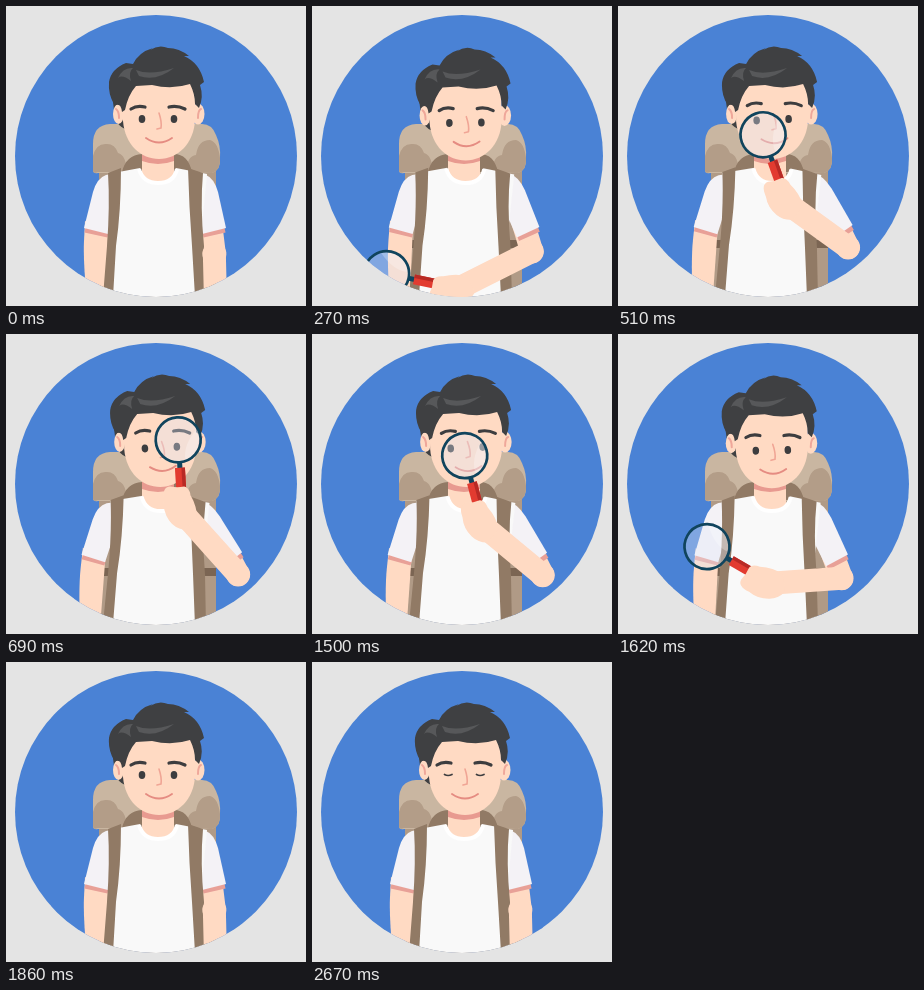
An HTML page that plays this animation: 300 by 300 pixels, repeating every 2700 ms.

```html
<!DOCTYPE html>
<html lang="en">
<head>
<meta charset="utf-8">
<title>Traveller with magnifying glass</title>
<style>
  html, body { margin: 0; height: 100%; overflow: hidden; background: #e4e4e4; }
  svg { display: block; width: 100vw; height: 100vh; }
  .skin { fill: #ffdac3; }
  .limb { stroke: #ffdac3; stroke-width: 23; stroke-linecap: round; }
  .shirt { fill: #f9f9f9; }
  .sleeve { fill: #f4f2f6; }
  .hem { fill: none; stroke: #e8a097; stroke-width: 5; }
  .hair { fill: #3f4042; }
  .strap { fill: #917a65; }
  .line { fill: none; stroke-linecap: round; stroke-linejoin: round; }
</style>
</head>
<body>
<svg viewBox="0 0 300 300">
  <clipPath id="disc"><circle cx="150" cy="150" r="141"/></clipPath>
  <circle cx="150" cy="150" r="141" fill="#4a82d5"/>
  <g clip-path="url(#disc)">
    <g id="pack">
      <path fill="#b09a86" d="M93 150H210V291H93Z"/>
      <path fill="#7b6553" d="M93 234H210V242H93Z"/>
      <path fill="#c9b6a1" d="M87 164V138Q87 119 104 118H196Q206 118 210 129Q215 140 214 152Q215 164 206 167H92Q87 168 87 164Z"/>
      <path fill="#b39d88" d="M87 150Q90 137 101 138Q109 138 112 147Q120 149 121 166H92Q87 168 87 164ZM180 166Q181 150 190 149Q192 134 204 134Q212 136 214 152Q215 164 206 167Z"/>
      <path class="strap" d="M116 166Q120 149 136 148V166ZM168 148Q182 148 186 166H168Z"/>
    </g>

    <g id="leftArm">
      <path class="skin" d="M79 215L78 235Q77 255 81 295H101L102 226Z"/>
      <path class="hem" d="M79 224L102 229"/>
      <path class="sleeve" d="M122 165L100 169Q91 172 87 186L78 222L102 228L112 190Z"/>
    </g>

    <line id="upperArm" class="limb"/>
    <g id="rightSleeve">
      <path class="hem" d="M197 229L219 224"/>
      <path class="sleeve" d="M180 165L200 169Q208 172 212 186L220 222L196 228L186 190Z"/>
    </g>

    <path class="skin" d="M136 138H168V182H136Z"/>
    <path fill="#e89a90" d="M136 146H168V155Q152 161 136 155Z"/>
    <g id="torso">
      <path class="shirt" d="M102 168L134 162Q138 176 152 176Q167 176 170 162L201 168L196 220L198 295H104L107 220Z"/>
      <path fill="none" stroke="#fff" stroke-width="4" d="M133 163Q137 177 152 177Q168 177 171 163"/>
      <path class="strap" d="M102 167L115 162Q115 205 110 240L107 291H97L101 240Q104 200 102 167ZM182 162L197 167Q194 200 198 240L200 291H189L186 240Q183 200 182 162Z"/>
    </g>

    <g id="head">
      <path class="hair" d="M106 88L109 112Q112 120 119 123L128 100V80Z"/>
      <ellipse class="skin" cx="112.500" cy="108" rx="5.500" ry="10"/>
      <ellipse class="skin" cx="192" cy="108" rx="6.500" ry="10.500"/>
      <path class="line" stroke="#efa79a" stroke-width="2" d="M192 112Q192 104 195 103M113 112Q113 105 110 103"/>
      <path class="skin" d="M117 68H189V114C188 137 172 153 153 153C135 153 119 139 117 115Z"/>
      <path class="hair" d="M108 98Q102 88 103 76Q105 63 120 57L127 58Q133 46 147 42L144 44Q153 38 162 42Q173 42 183 50L178 50Q194 57 198 76L194 79Q198 91 193 102L189 98Q189 88 184 78Q166 84 146 79L130 80Q122 89 119 104L116 106Q115 97 110 99Z"/>
      <path fill="#57585a" d="M112 72Q117 61 127 62Q122 66 125 75Q116 68 112 72ZM130 64Q144 70 168 62Q150 76 133 70Z"/>
      <g id="brows" class="line" stroke="#3d3d3f" stroke-width="3.2">
        <path d="M125 103Q131 99 139 101M163 101Q171 99 179 103"/>
      </g>
      <g id="face">
        <g id="open" fill="#3d3d3f">
          <ellipse cx="136" cy="113" rx="3.300" ry="4"/>
          <ellipse cx="168" cy="113" rx="3.300" ry="4"/>
        </g>
        <path id="shut" class="line" stroke="#3d3d3f" stroke-width="1.7" d="M132.500 112.500Q136 114.500 140 112.500M164.500 112.500Q168 114.500 172 112.500"/>
        <path class="line" stroke="#f0a595" stroke-width="1.6" d="M153 107Q156 116 155 122L151 123"/>
        <path class="line" stroke="#e58c82" stroke-width="1.9" d="M140 132Q153 141 166 132"/>
      </g>
    </g>

    <circle id="elbow" class="skin" r="12"/>
    <line id="forearm" class="limb"/>
    <g id="glass">
      <circle r="22" fill="#dfe6f6" fill-opacity=".36"/>
      <path fill="#fff" fill-opacity=".25" d="M-10 -19.500A22 22 0 0 1 21 -6Q6 -4 -10 -19.500Z"/>
      <circle r="22.500" fill="none" stroke="#10445d" stroke-width="2.700"/>
      <path fill="#10445d" d="M23 -2.500H31V2.500H23Z"/>
      <path fill="#e23b30" d="M28 -5H60V5H28Z"/>
      <path fill="#b82a25" d="M28 -5H60V-1.500H28Z"/>
      <path class="skin" d="M47 -3Q48 -8 56 -9Q68 -15 80 -14L90 0Q88 9 80 14Q70 20 59 18Q46 19 46 11Q48 4 47 -3Z"/>
    </g>
  </g>
</svg>
<script>
const LOOP = 2700, STEP = 30;
const SHOULDER = [200, 180], UPPER = 68.5;
const el = id => document.getElementById(id);
const set = (id, attrs) => {
  for (const name in attrs) el(id).setAttribute(name, attrs[name]);
};
const move = (id, transform) => set(id, { transform });
const join = (id, [x1, y1], [x2, y2]) => set(id, { x1, y1, x2, y2 });
const polar = ([x, y], length, degrees) => {
  const a = degrees * Math.PI / 180;
  return [x + length * Math.cos(a), y + length * Math.sin(a)];
};
const clamp = v => Math.min(1, Math.max(0, v));

// 0 = arm hanging, 1 = glass held in front of the eye
function lift(t) {
  if (t < 1470) return 1 - (1 - clamp((t - 120) / 570)) ** 2.06;
  return 1 - clamp((t - 1475) / 385);
}

function draw(t) {
  const q = lift(t);

  const upper = 83 - 21 * q;
  const elbow = polar(SHOULDER, UPPER, upper);
  const reach = Math.min(150, 136.5 + 150 * (q - 0.73) ** 2);
  const swing = 106 + 140 * q;
  const lens = polar(elbow, reach, swing);
  const axis = swing - 164.5 + Math.min(5, 80 * (q - 0.75) ** 2);

  join("upperArm", polar(SHOULDER, 30, upper), elbow);
  move("rightSleeve", `translate(${SHOULDER}) rotate(${upper - 83}) scale(1 ${1 + 0.16 * q}) translate(-200 -180)`);
  set("elbow", { cx: elbow[0], cy: elbow[1] });
  join("forearm", elbow, polar(lens, 73, axis));
  move("glass", `translate(${lens}) rotate(${axis})`);

  move("leftArm", `rotate(${3.5 * q} 97 180)`);
  move("torso", `rotate(${1.2 * q} 150 290)`);

  const dip = 3.5 * Math.sin(Math.PI * q) ** 2;
  move("head", `translate(${1.2 * q} ${dip * 0.4})`);
  move("face", `translate(${1.8 * q} ${0.5 * q + dip * 0.6}) rotate(${-3 * q * q} 153 115)`);
  move("brows", `translate(${3.5 * q} ${dip * 0.6 - 4 * q})`);

  const blink = t >= 2670;
  set("open", { visibility: blink ? "hidden" : "visible" });
  set("shut", { visibility: blink ? "visible" : "hidden" });
}

function tick() {
  const t = performance.now() % LOOP;
  draw(Math.floor(t / STEP) * STEP);
  requestAnimationFrame(tick);
}
tick();
</script>
</body>
</html>
```
